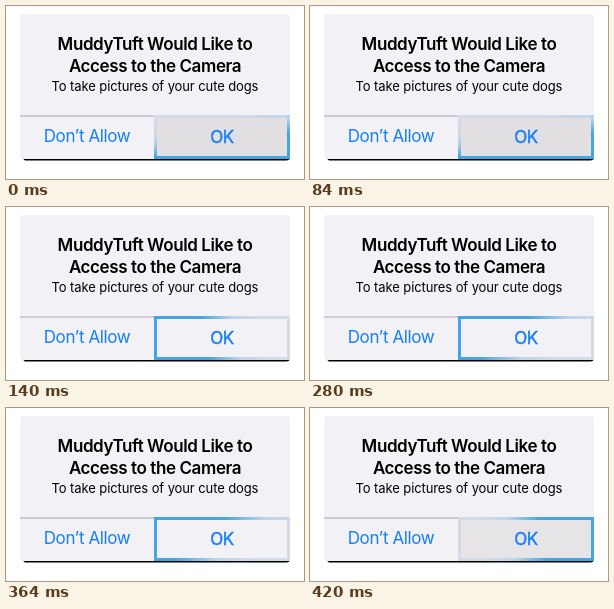
These frames come from a looping animation (298x173 px, 0.56 s). An HTML page:

```html
<!DOCTYPE html>
<html lang="en">
<head>
<meta charset="utf-8">
<style>
html, body { margin: 0; width: 100%; height: 100%; overflow: hidden; background: #fff; }
svg { position: absolute; left: 0; top: 0; }
text { font-family: Inter, "Liberation Sans", sans-serif; text-anchor: middle; }
.title { font-size: 17px; font-weight: 600; letter-spacing: -.4px; }
.note { font-size: 13px; letter-spacing: -.1px; }
.action { font-size: 17px; fill: #147efb; letter-spacing: -.4px; }
.ok {
  position: absolute; left: 148px; top: 109px; width: 136px; height: 44px;
  box-sizing: border-box; border: 3px solid transparent;
  --fill: #e1dfe1; --angle: 170deg;
  background:
    linear-gradient(var(--fill), var(--fill)) padding-box,
    linear-gradient(var(--angle), #d3dbe8 20%, #bdd4ea 40%, #43a5e2 62%) border-box;
  animation: turn 560ms step-end infinite;
}
@keyframes turn {
  0%   { --angle: 170deg; --fill: #e1dfe1; }
  25%  { --angle: 260deg; --fill: #f2f1f6; }
  50%  { --angle: 320deg; --fill: #f2f1f6; }
  75%  { --angle: 80deg;  --fill: #e7e4e7; }
}
</style>
</head>
<body>
<svg width="298" height="173">
  <path d="M15 151H284Q284 154.6 280 154.6H19Z" fill="#000"/>
  <path d="M18 8H280Q284 8 284 12V153H18Q14 153 14 149V12Q14 8 18 8Z" fill="#f2f1f6"/>
  <path d="M14 110H148" stroke="#cbccd6" stroke-width="2"/>
</svg>
<div class="ok"></div>
<svg width="298" height="173">
  <text class="title" x="149" y="44">MuddyTuft Would Like to</text>
  <text class="title" x="149" y="66">Access to the Camera</text>
  <text class="note" x="149" y="85">To take pictures of your cute dogs</text>
  <text class="action" x="81" y="136">Don’t Allow</text>
  <text class="action" x="216" y="137" stroke="#147efb" stroke-width=".4">OK</text>
</svg>
</body>
</html>
```
